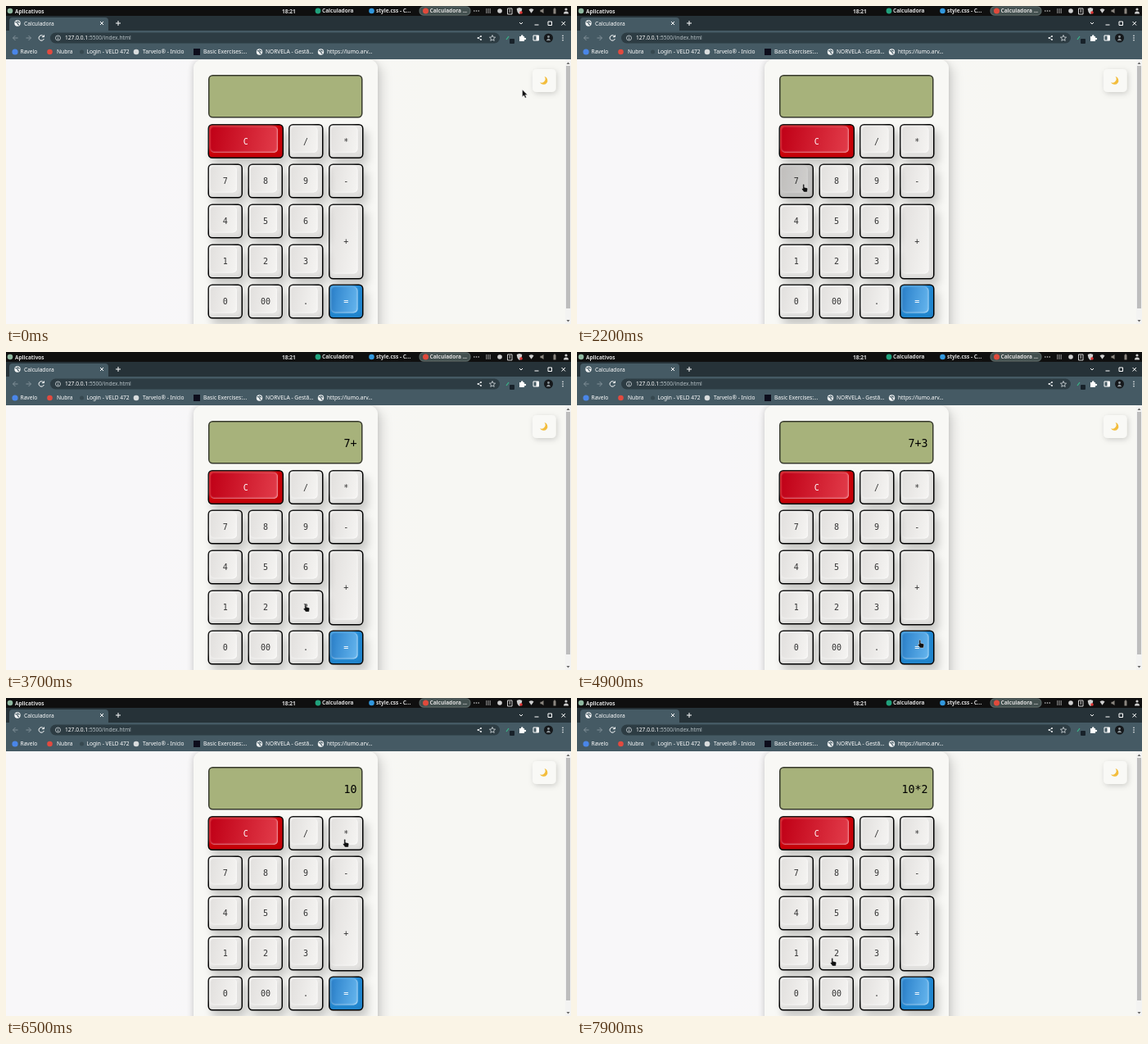
These frames come from a looping animation (690 by 388 pixels, 8 s). An HTML page:

```html
<!DOCTYPE html>
<html lang="pt-BR">
<head>
<meta charset="utf-8">
<title>Calculadora</title>
<style>
html, body { margin: 0; width: 100%; height: 100%; overflow: hidden; }
body { position: relative; background: linear-gradient(90deg, #f8f7f9 25%, #f7f7f3 75%); }
svg { position: absolute; left: 0; top: 0; }
svg text { font: 6.65px "Noto Sans", "Open Sans", sans-serif; fill: #fff; }
svg .b { font-weight: 700; font-size: 6.5px; fill: #dcdcdc; }
/* laid out at double size, so that half pixels are kept */
#calc { position: absolute; left: 0; top: 0; width: 1380px; height: 776px; transform: scale(.5); transform-origin: 0 0; }
#body, #screen, .key, .key::before { position: absolute; box-sizing: border-box; }
#body { left: 458px; top: 131px; width: 450px; height: 680px; border-radius: 20px; background: #f8f8f5;
  box-shadow: 10px 12px 28px rgba(0,0,0,.15), -2px 0 14px rgba(0,0,0,.13); }
#screen { left: 494px; top: 168px; width: 377px; height: 105px; padding-right: 11px;
  border: 3px solid #36392c; border-radius: 11px; background: #a7b27b; color: #000;
  font: 26.6px/101px "DejaVu Sans Mono", monospace; text-align: right; }
.key { display: flex; align-items: center; justify-content: center; border: 3px solid #000; border-radius: 11px;
  background: var(--out); color: var(--ink); font: 20px "DejaVu Sans Mono", monospace;
  box-shadow: inset -8px 0 8px rgba(0,0,0,.05), inset 0 -8px 8px rgba(0,0,0,.07), 10px 16px 22px rgba(0,0,0,.2); }
.key::before { content: ""; left: 3px; top: 3px; right: 11px; bottom: 11px; border-radius: 10px;
  background: linear-gradient(100deg, var(--a), var(--z));
  box-shadow: -4px -4px 8px rgba(255,255,255,.25), 4px 3px 8px rgba(0,0,0,.06), inset -1px -1px 4px rgba(255,255,255,.7); }
.key span { position: relative; }
.key.down { filter: brightness(.85); }
</style>
</head>
<body>
<div id="calc"><div id="body"></div><div id="screen"></div></div>
<svg id="ui" width="690" height="388" viewBox="0 0 690 388">
  <defs>
    <g id="globe"><circle r="3.7" fill="#f4f6f7"/><path d="M-2.7-1.2Q-.5-1.8 0 0T2 2.2M0-2.8Q.4-1 2.7-.9" fill="none" stroke="#455a64" stroke-width="1.1"/></g>
    <filter id="soft" x="-50%" y="-50%" width="200%" height="200%"><feDropShadow dx="1.5" dy="2" stdDeviation="3" flood-opacity=".17"/></filter>
  </defs>

  <path d="M0 0H690V12H0Z" fill="#0f0f0f"/>
  <rect x="505" y=".8" width="62" height="10.400" rx="4.500" fill="#43504f" stroke="#7b8a88" stroke-width=".7"/>
  <path d="M0 12H690V30H0Z" fill="#263238"/>
  <path d="M0 30H4V18Q4 14 8 14H121Q125 14 125 18V30H690V65H0Z" fill="#455a64"/>
  <rect x="54" y="32.5" width="549" height="13" rx="6.5" fill="#2d3c43"/>

  <!-- desktop bar -->
  <circle cx="5" cy="6" r="3.3" fill="#8fb8a0"/>
  <circle cx="381" cy="6" r="3.4" fill="#20a27c"/>
  <circle cx="446.500" cy="6" r="3.3" fill="#3298de"/>
  <circle cx="512.500" cy="6" r="3.5" fill="#e04a3c"/>
  <g fill="#cfcfcf">
    <circle cx="571.800" cy="6" r=".8"/><circle cx="574.500" cy="6" r=".8"/><circle cx="577.200" cy="6" r=".8"/>
    <circle cx="603" cy="6" r="2.800"/>
    <path d="M638.500 4.500Q641.500 2 644.500 4.500L641.500 8.800Z"/>
    <path d="M623.800 3L627 2L630.200 3Q630.200 8 627 10Q623.800 8 623.800 3Z"/>
    <circle cx="684" cy="4" r="1.600"/><path d="M681 9.500Q681 6.500 684 6.500T687 9.500Z"/>
  </g>
  <g fill="#8c8780">
    <path d="M652.500 4.800H654L656.500 3V9L654 7.200H652.500Z"/>
    <path d="M668.500 3.500H669.300V2.500H670.800V3.500H671.500V9.500H668.500Z"/>
  </g>
  <circle cx="629" cy="8" r="1.800" fill="#d33"/>
  <g fill="none" stroke="#cfcfcf">
    <path d="M586 4H592M586 6H592M586 8H592" stroke-width="1.100" stroke-dasharray="1.400 .9"/>
    <path d="M612.500 3H618V10H612.500ZM615.200 4V8"/>
  </g>

  <!-- tab, window buttons and toolbar -->
  <g fill="none" stroke="#fff" stroke-width="1">
    <path d="M115 19L119 23M119 19L115 23M134 21H140M137 18V24M627 20L629 22L631 20M645.500 23H650.500M662 19H666.500V23.500H662ZM678.500 19L683 23.500M683 19L678.500 23.500"/>
    <path d="M14.500 39H8.500M11.500 36L8.500 39L11.500 42M24.500 39H30.500M27.500 36L30.500 39L27.500 42" stroke="#829199"/>
    <path d="M45.800 37A3.200 3.200 0 1 0 46.300 40M46.500 35.500V37.700H44"/>
    <g stroke="#d4dadd" stroke-width=".8">
      <circle cx="63.500" cy="39" r="3"/><path d="M63.500 37V37.700M63.500 38.500V41"/>
      <path d="M580 37L576.500 39L580 41"/>
      <path d="M594 35.500L595 38L597.600 38.200L595.600 39.900L596.200 42.400L594 41L591.800 42.400L592.400 39.900L590.400 38.200L593 38Z"/>
    </g>
    <path d="M644 36H650.500V42H644Z"/>
  </g>
  <g fill="#fff">
    <circle cx="580" cy="37" r=".9"/><circle cx="576.500" cy="39" r=".9"/><circle cx="580" cy="41" r=".9"/>
    <path d="M627 37H629A1.300 1.300 0 1 1 631.500 37H633V39A1.300 1.300 0 1 1 633 41V43H627Z"/>
    <path d="M647.500 36H651V42H647.500Z"/>
    <circle cx="680" cy="36.300" r=".8"/><circle cx="680" cy="39" r=".8"/><circle cx="680" cy="41.700" r=".8"/>
  </g>
  <path d="M611 41L614 37" stroke="#39b88a" stroke-width="1.200"/>
  <rect x="615" y="40" width="6" height="6" rx="1" fill="#18222a"/>
  <circle cx="662.500" cy="39" r="5.500" fill="#15181b"/>
  <circle cx="662.500" cy="37.500" r="1.400" fill="#8c9499"/>
  <path d="M659.800 42.200Q662.500 37.500 665.200 42.200Z" fill="#8c9499"/>

  <!-- bookmark icons -->
  <circle cx="11" cy="56" r="3.600" fill="#4a86e8"/>
  <circle cx="53.500" cy="56" r="3.300" fill="#e24a3f"/>
  <circle cx="92.500" cy="56" r="2.500" fill="#36484f"/>
  <circle cx="159" cy="56" r="3.300" fill="#d9dcdd"/>
  <rect x="229" y="52" width="8" height="8" fill="#0d0d1c"/>
  <use href="#globe" x="14" y="21"/><use href="#globe" x="309.500" y="56"/><use href="#globe" x="384.500" y="56"/>

  <!-- theme button and scrollbar -->
  <rect x="643" y="77" width="28.500" height="28" rx="5" fill="#f9f9f6" filter="url(#soft)"/>
  <path d="M657.500 86a5 5 0 1 1-5.500 7.300a4.700 4.700 0 0 0 5.500-7.300z" fill="#f3bd3c"/>
  <path d="M683 65H690V388H683Z" fill="#f3f3f2"/>
  <path d="M684 73H689V369H684Z" fill="#bdbdbd"/>
  <path d="M684.500 71L686.500 68.500L688.500 71ZM684.500 383L686.500 385.500L688.500 383Z" fill="#666"/>
</svg>
<svg width="690" height="388" viewBox="0 0 690 388">
  <g id="cursor" fill="#111" stroke="#fff" stroke-width=".4">
    <path id="arrow" d="M0 0V8.700L2 7L3.500 10.200L5 9.500L3.600 6.400H6.300Z"/>
    <path id="hand" d="M2.500.2Q3.700.2 3.700 1.400V4.200L6.700 4.900Q7.900 5.300 7.700 6.500L7.100 10H3L.5 6.500Q.1 5.400 1.200 5.400L1.800 6V1.200Q1.800.2 2.500.2Z"/>
  </g>
</svg>
<script>
const $ = id => document.getElementById(id);
const LOOP = 8000, STEP = 100;

// text, x, baseline, class
[
  ['Aplicativos', 11, 8.700, 'b'], ['18:21', 337, 8.700, 'b'], ['Calculadora', 386, 8.300, 'b'],
  ['style.css - C...', 452, 8.300, 'b'], ['Calculadora ...', 517.500, 8.300, 'b'],
  ['Calculadora', 22, 23.500], ['127.0.0.1:5500/index.html', 72, 41.300],
  ['Ravelo', 17.500, 58.200], ['Nubra', 62, 58.200], ['Login - VELD 472', 98.500, 58.200],
  ['Tarvelo® - Início', 167, 58.200], ['Basic Exercises:...', 241, 58.200],
  ['NORVELA - Gestã...', 317, 58.200], ['https://lumo.arv...', 392, 58.200]
].forEach(([text, x, y, cls = '']) => {
  const el = document.createElementNS('http://www.w3.org/2000/svg', 'text');
  el.setAttribute('x', x);
  el.setAttribute('y', y);
  el.setAttribute('class', cls);
  el.innerHTML = text.replace(/:5500.*/, '<tspan fill="#b4bfc4">$&</tspan>');
  $('ui').append(el);
});

// outer colour, bevel from and to, ink
const GREY = ['#f1f0ee', '#e2e0de', '#f5f4f2', '#333'];
const RED = ['#d4000a', '#c00016', '#e23c4a', '#fff'];
const BLUE = ['#2590dd', '#2a80ca', '#66b6ee', '#fff'];
const keys = {};

function addKey(label, col, row, w = 1, h = 1, colors = GREY) {
  const left = 493 + col * 98.3, top = 287.6 + row * 97.8;
  const width = 85 + (w - 1) * 100, height = 84 + (h - 1) * 100;
  const el = document.createElement('div');
  el.className = 'key';
  el.innerHTML = `<span>${label}</span>`;
  for (const [name, v] of Object.entries({ left, top, width, height })) el.style[name] = v + 'px';
  ['--out', '--a', '--z', '--ink'].forEach((name, i) => el.style.setProperty(name, colors[i]));
  $('calc').append(el);
  const hit = (x, y) => 2 * x > left && 2 * x < left + width && 2 * y > top && 2 * y < top + height;
  keys[label] = { el, hit };
}
addKey('C', 0, 0, 2, 1, RED);
addKey('/', 2, 0);
addKey('*', 3, 0);
addKey('-', 3, 1);
addKey('+', 3, 2, 1, 2);
addKey('=', 3, 4, 1, 1, BLUE);
['789', '456', '123', ['0', '00', '.']].forEach((row, r) => [...row].forEach((k, c) => addKey(k, c, r + 1)));

// key, pressed, released, screen after release
const presses = [
  ['7', 2200, 2400, '7'], ['+', 3300, 3500, '7+'], ['3', 4100, 4300, '7+3'],
  ['=', 5100, 5300, '10'], ['*', 6600, 6800, '10*'], ['2', 7700, 7900, '10*2']
];

// time, x, y of the pointer
const path = [
  [0, 630.5, 102], [900, 400, 215], [1000, 250, 181], [1100, 250, 181], [1400, 246, 190],
  [1700, 260, 231], [2000, 274, 217], [2400, 274, 217], [2600, 412, 277], [2700, 412, 277],
  [3200, 415, 288], [3400, 415, 288], [3700, 363, 307], [3900, 361, 314], [4500, 361, 314],
  [4700, 394, 342], [4800, 394, 342], [4900, 416, 351], [5600, 416, 351], [6200, 411, 176],
  [6400, 411, 172], [6800, 411, 172], [6900, 385, 205], [7000, 385, 205], [7500, 309, 317], [LOOP, 309, 317]
];

function pointerAt(t) {
  const i = path.findIndex(p => p[0] > t);
  const [t0, x0, y0] = path[i - 1], [t1, x1, y1] = path[i];
  const k = (t - t0) / (t1 - t0);
  return [x0 + (x1 - x0) * k, y0 + (y1 - y0) * k];
}

function draw(now) {
  const t = Math.floor(now % LOOP / STEP) * STEP;
  let text = '';
  for (const [label, from, to, result] of presses) {
    keys[label].el.classList.toggle('down', t >= from && t < to);
    if (t >= to) text = result;
  }
  $('screen').textContent = text;

  const [x, y] = pointerAt(t);
  const over = Object.values(keys).some(k => k.hit(x + 3, y));
  $('cursor').setAttribute('transform', `translate(${x} ${y})`);
  $('hand').style.display = over ? '' : 'none';
  $('arrow').style.display = over ? 'none' : '';
  requestAnimationFrame(draw);
}
requestAnimationFrame(draw);
</script>
</body>
</html>
```
